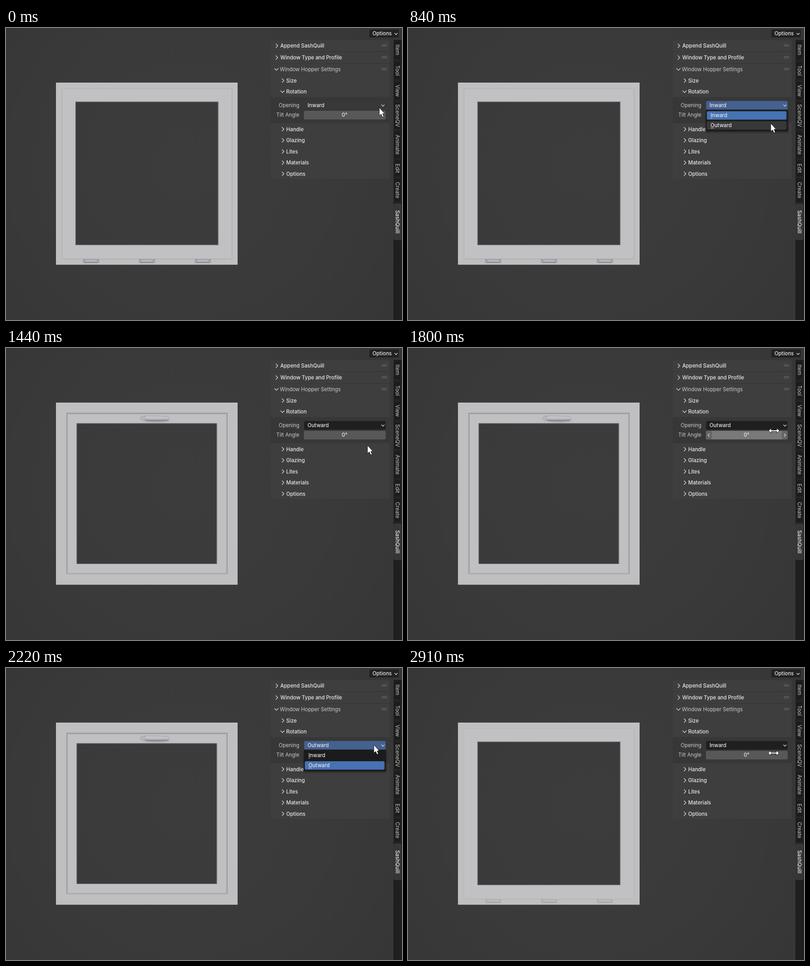
Recreate the animation shown at these times as an HTML page. Size 872 by 642 pixels, loop 2.94 s.

```html
<!DOCTYPE html>
<html lang="en">
<head>
<meta charset="utf-8">
<title>Hopper window settings</title>
<style>
  html, body { margin: 0; width: 100%; height: 100%; overflow: hidden; background: #393939; }
  svg { display: block; width: 872px; height: 642px; }
  text { font: 500 11.4px Inter, "Noto Sans", sans-serif; fill: #e8e8e8; white-space: pre; }
  .dim { font-weight: 400; fill: #c9c9c9; }
  .chevron { fill: none; stroke: #d2d2d2; stroke-width: 1.4; stroke-linecap: round; stroke-linejoin: round; }
</style>
</head>
<body>
<svg id="stage" viewBox="0 0 872 642" xmlns="http://www.w3.org/2000/svg">
  <defs>
    <radialGradient id="backdrop" gradientUnits="userSpaceOnUse" cx="400" cy="300" r="560">
      <stop offset="0" stop-color="#3c3c3c"/>
      <stop offset=".55" stop-color="#3a3a3a"/>
      <stop offset="1" stop-color="#363636"/>
    </radialGradient>
    <linearGradient id="lever" x1="0" y1="0" x2="0" y2="1">
      <stop offset="0" stop-color="#cbcbce"/>
      <stop offset=".55" stop-color="#bcbcc0"/>
      <stop offset="1" stop-color="#8b8b91"/>
    </linearGradient>
    <filter id="soft" x="-20%" y="-50%" width="140%" height="200%">
      <feGaussianBlur stdDeviation="1.5"/>
    </filter>
  </defs>
</svg>
<script>
const LOOP = 2940;
const OPEN_INWARD = 240, PICK_OUTWARD = 1230, OPEN_OUTWARD = 2160, PICK_INWARD = 2880;
const stage = document.getElementById("stage");

function add(parent, tag, attrs = {}, content) {
  const node = document.createElementNS("http://www.w3.org/2000/svg", tag);
  for (const key in attrs) node.setAttribute(key, attrs[key]);
  if (content !== undefined) node.textContent = content;
  parent.appendChild(node);
  return node;
}
const group = (parent, attrs) => add(parent, "g", attrs);
const box = (parent, x, y, right, bottom, fill, rx = 0, more = {}) =>
  add(parent, "rect", { x, y, width: right - x, height: bottom - y, fill, rx, ...more });
const label = (parent, x, centre, content, more = {}) =>
  add(parent, "text", { x, y: centre + 4.1, ...more }, content);
const line = (parent, d, stroke, width = 1, more = {}) =>
  add(parent, "path", { d, stroke, "stroke-width": width, fill: "none", ...more });
const show = (node, visible) => node.setAttribute("display", visible ? "inline" : "none");

function chevron(parent, x, y, direction, size = 4) {
  const turn = { right: 0, down: 90, left: 180 }[direction];
  const half = size / 2;
  add(parent, "path", { class: "chevron", d: `M${-half} ${-size}L${half} 0L${-half} ${size}`,
    transform: `translate(${x} ${y}) rotate(${turn})` });
}

function handle(parent, y) {
  const g = group(parent, { transform: `translate(0 ${y})` });
  add(g, "ellipse", { cx: 332, cy: 4, rx: 28, ry: 4, fill: "#77777d", opacity: .45, filter: "url(#soft)" });
  add(g, "ellipse", { cx: 306, cy: 0, rx: 10, ry: 5.5, fill: "#b7b7bb", stroke: "#98989d", "stroke-width": .8 });
  add(g, "path", { d: "M309-5.5C319-6 342-5 354-4.5C360-4 360 4 354 4.3C340 5 324 5.8 312 5C302 4.5 302-5 309-5.5Z",
    fill: "url(#lever)", stroke: "#8e8e94", "stroke-width": .7 });
  line(g, "M307 3.8Q326 5.7 355 4", "#77777d", 1);
}

function hinge(parent, x) {
  const g = group(parent, { transform: `translate(${x} 0)` });
  box(g, 0, 509, 35, 516.5, "#aaaaae", 1, { stroke: "#98989c", "stroke-width": .7 });
  box(g, 4, 509.5, 31, 513.5, "#c9c9cc", 1);
  line(g, "M0 510.2H35", "#85858a");
  line(g, "M3 514.5H32", "#737378", 1.3);
  line(g, "M4 510V516M31 510V516", "#8b8b90", .8);
}

function opening(parent, x, y, right, bottom) {
  box(parent, x, y, right, bottom, "url(#backdrop)");
  line(parent, `M${x} ${bottom}V${y}H${right}`, "#626267", 1.4);
  line(parent, `M${right} ${y}V${bottom}`, "#8c8c91", 1.6);
  line(parent, `M${x} ${bottom}H${right}`, "#76767c", 1);
}

function drawInwardWindow() {
  const g = group(stage);
  box(g, 110, 120, 510, 520.5, "#bfbfc1");
  const detail = group(g);
  box(detail, 123, 133, 498, 508, "#8e8e94", 0, { opacity: .28, filter: "url(#soft)" });
  box(g, 124, 134, 497, 507, "#c1c1c4");
  line(detail, "M124 507V134H497", "#b0b0b4");
  line(detail, "M497 134V507H124", "#9d9da2");
  opening(g, 153.5, 162.5, 467.5, 477);
  handle(detail, 147.5);
  [170, 293, 416].forEach(x => hinge(detail, x));
  return { g, detail };
}

function drawOutwardWindow() {
  const g = group(stage);
  box(g, 110, 120, 510, 520.5, "#bfbfc1");
  box(g, 134, 143.5, 487, 497, "#c0c0c3");
  const detail = group(g);
  line(detail, "M134 497V143.5H487V497", "#85858a", 1.3);
  line(detail, "M134 496.5H487", "#98989d", 1.2);
  line(detail, "M136 495V145.5H485V495Z", "#adadb2", 1);
  opening(g, 156, 166, 464.5, 474.5);
  handle(detail, 155);
  return { g, detail };
}

function drawSidebar() {
  box(stage, 800, 3, 865, 21, "#222", 3);
  label(stage, 807, 12, "Options");
  chevron(stage, 859, 13, "down", 3);

  const panel = group(stage);
  [[27, 51], [53, 77], [79, 332]].forEach(([top, bottom]) => box(panel, 583, top, 845, bottom, "#3e3e3e", 2));
  box(panel, 583, 152, 845, 209, "#373737");
  [["Append SashQuill", 39], ["Window Type and Profile", 65], ["Window Hopper Settings", 91]].forEach(([title, y], i) => {
    const open = i === 2;
    chevron(panel, open ? 595.5 : 596.5, y, open ? "down" : "right");
    label(panel, open ? 603 : 604, y, title, open ? { class: "dim" } : {});
    for (let dot = 0; dot < 8; dot++)
      box(panel, 828 + dot % 4 * 3, y - 3 + (dot >> 2) * 3, 829.3 + dot % 4 * 3, y - 1.7 + (dot >> 2) * 3, "#999");
  });
  [["Size", 115.5], ["Rotation", 140], ["Handle", 222.5], ["Glazing", 247], ["Lites", 271.5],
   ["Materials", 296], ["Options", 320.5]].forEach(([title, y]) => {
    const open = title === "Rotation";
    chevron(panel, open ? 609 : 610, y, open ? "down" : "right");
    label(panel, 617, y, title);
  });
  label(panel, 646, 169.5, "Opening", { class: "dim", "text-anchor": "end" });
  label(panel, 646, 191.3, "Tilt Angle", { class: "dim", "text-anchor": "end" });

  box(stage, 853, 26, 872, 642, "#1e1f1f");
  [["Item", 26, 70], ["Tool", 73, 114], ["View", 117, 159], ["SceneQV", 162, 223], ["Animate", 226, 287],
   ["Edit", 290, 327], ["Create", 330, 383], ["SashQuill", 386, 466]].forEach(([title, top, bottom], i) => {
    const active = i === 7;
    box(stage, 853.5, top, 870.5, bottom, active ? "#363636" : "#1c1c1c", 3,
      { stroke: active ? "#363636" : "#303030", "stroke-width": .8 });
    add(stage, "text", { transform: `translate(857.8 ${(top + bottom) / 2}) rotate(90)`, "text-anchor": "middle",
      class: active ? "" : "dim" }, title);
  });
}

function drawFields() {
  const slider = box(stage, 656, 182, 836, 201, "#585858", 3);
  const steppers = group(stage);
  box(steppers, 656, 182, 669, 201, "#656565", 3);
  box(steppers, 823, 182, 836, 201, "#656565", 3);
  chevron(steppers, 662, 191.5, "left", 3);
  chevron(steppers, 830, 191.5, "right", 3);
  label(stage, 745.5, 191.3, "0°", { "text-anchor": "middle" });
  const select = box(stage, 656.5, 160.5, 836, 179.5, "#1f1f1f", 3);
  const value = label(stage, 664, 169.5, "Inward");
  chevron(stage, 830, 170.5, "down", 3);

  const menu = group(stage);
  box(menu, 655, 182, 838, 230, "#000", 4, { opacity: .3, filter: "url(#soft)" });
  box(menu, 656, 179.5, 836.5, 227, "#1b1b1b", 3);
  const rows = ["Inward", "Outward"].map((title, i) => {
    const y = 192 + i * 22;
    const back = box(menu, 658, y - 9, 833.5, y + 9.5, "none", 3);
    label(menu, 666, y, title);
    line(menu, `M666 ${y + 6}h${i ? 8 : 4}`, "#d8d8d8", .9);
    return back;
  });
  return { slider, steppers, select, value, menu, rows };
}

function drawCursors() {
  const style = { fill: "#fff", stroke: "#1a1a1a", "stroke-width": 1, "stroke-linejoin": "round" };
  return {
    arrow: add(stage, "path", { d: "M0 0V18L4 14.4L7 21L10 19.6L7.2 13.2H12Z", ...style }),
    resize: add(stage, "path", { d: "M-12 0L-6-5.5V-1.5H6V-5.5L12 0L6 5.5V1.5H-6V5.5Z", ...style })
  };
}

box(stage, 0, 0, 872, 642, "url(#backdrop)");
const inward = drawInwardWindow();
const outward = drawOutwardWindow();
drawSidebar();
const ui = drawFields();
const cursors = drawCursors();

// Each move: start, end, destination, ease-out power
const moves = [
  [30, 330, 827, 173.5, 2],
  [570, 930, 797, 212, 2],
  [1079, 1080, 796, 214, 1],
  [1620, 2100, 810, 169, 2.64],
  [2430, 2670, 805, 187, 2]
];

function cursorAt(t) {
  let x = 822, y = 175;
  for (const [start, end, toX, toY, power] of moves) {
    if (t <= start) break;
    const p = 1 - (1 - Math.min(1, (t - start) / (end - start))) ** power;
    x += (toX - x) * p;
    y += (toY - y) * p;
  }
  return { x, y };
}

function render(t) {
  const isOutward = t >= PICK_OUTWARD && t < PICK_INWARD;
  const menuOpen = t >= OPEN_INWARD && t < PICK_OUTWARD || t >= OPEN_OUTWARD && t < PICK_INWARD;
  const { x, y } = cursorAt(t);
  const onSlider = !menuOpen && y > 181.3 && y < 202;
  const onSelect = !menuOpen && y <= 181.3;

  show(inward.g, !isOutward);
  show(outward.g, isOutward);
  // Surface detail sharpens shortly after each switch.
  const sharpness = Math.min(1, .6 + Math.max(0, t - PICK_OUTWARD) / 525);
  outward.detail.setAttribute("opacity", sharpness);
  inward.detail.setAttribute("opacity", t >= PICK_INWARD ? .45 : 1);

  const sliderHot = onSlider && t < PICK_INWARD;
  ui.slider.setAttribute("fill", sliderHot ? "#797979" : "#585858");
  show(ui.steppers, sliderHot);
  ui.select.setAttribute("fill", menuOpen ? "#446190" : onSelect ? "#383838" : "#1f1f1f");
  ui.value.textContent = isOutward ? "Outward" : "Inward";
  show(ui.menu, menuOpen);
  ui.rows.forEach((row, i) => {
    const selected = i === Number(isOutward);
    const hovered = y > 182 + 22 * i && y < 202 + 22 * i;
    row.setAttribute("fill", selected ? "#4772b3" : hovered ? "#383838" : "none");
  });

  show(cursors.arrow, !onSlider);
  show(cursors.resize, onSlider);
  for (const cursor of Object.values(cursors)) cursor.setAttribute("transform", `translate(${x} ${y})`);
}

const origin = performance.now();
function tick() {
  render((performance.now() - origin) % LOOP);
  requestAnimationFrame(tick);
}
render(0);
requestAnimationFrame(tick);
</script>
</body>
</html>
```
